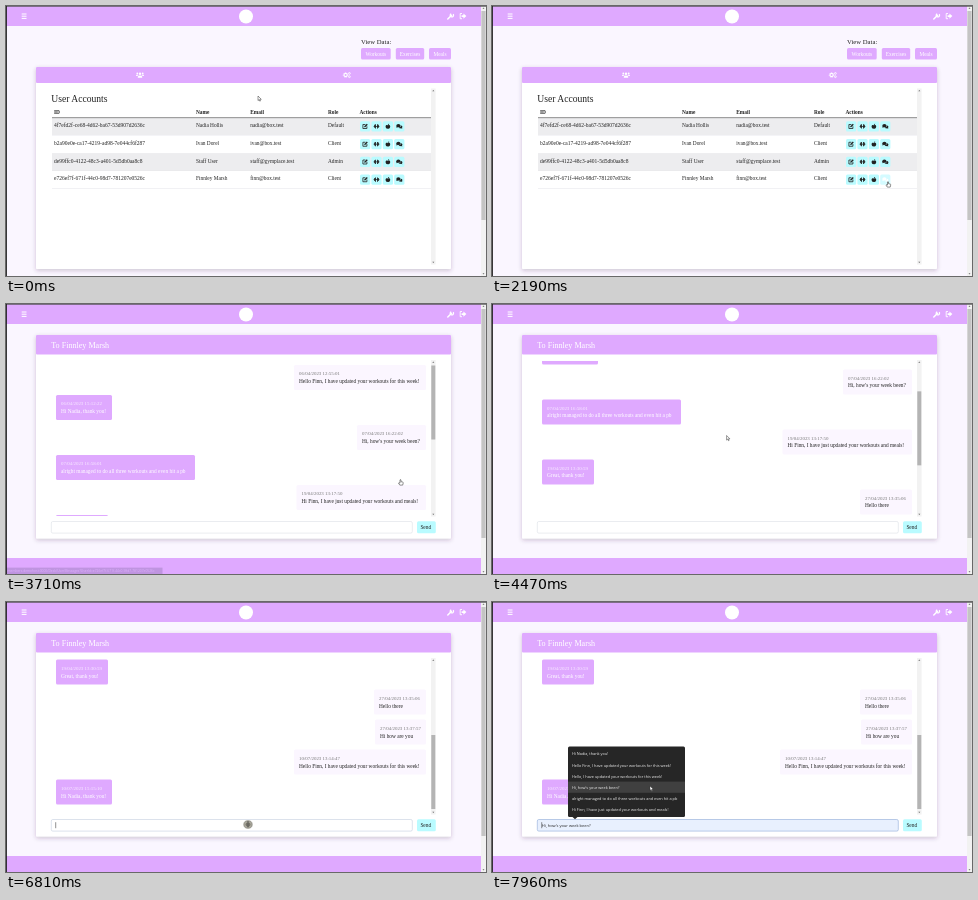
An HTML page that plays this animation: 480 px wide and 270 px high, repeating every 7.99 s.

```html
<!DOCTYPE html>
<html lang="en">
<head>
<meta charset="utf-8">
<title>Messages</title>
<style>
html, body { margin: 0; width: 100%; height: 100%; overflow: hidden; background: #faf6ff; }
svg { display: block; width: 100vw; height: 100vh; }
text { font-family: "Liberation Serif", serif; white-space: pre; }
.sans { font-family: "Open Sans", "Noto Sans", sans-serif; }
</style>
</head>
<body>
<svg id="stage" viewBox="0 0 480 270">
  <defs>
    <filter id="shadow" x="-10%" y="-10%" width="120%" height="125%">
      <feDropShadow dx="0" dy="1.6" stdDeviation="2.2" flood-color="#3b2a4a" flood-opacity=".24"/>
    </filter>
    <clipPath id="pane"><rect x="45" y="57" width="380" height="155"/></clipPath>
    <g id="edit" fill="none" stroke="currentColor" stroke-width=".8">
      <path d="M.3-1.8H-2.2V2.2H1.8V0"/><path d="M-.6.7L2.2-2.1" stroke-width="1.3"/>
    </g>
    <g id="dumbbell" fill="currentColor">
      <path d="M-2.9-.4H2.9V.4H-2.9zM-2.4-1.5h.8v3h-.8zM1.6-1.5h.8v3h-.8zM-1.5-2.1h.9v4.2h-.9zM.6-2.1h.9v4.2H.6z"/>
    </g>
    <g id="apple" fill="currentColor">
      <path d="M0-.9C1-1.7 2.5-1.2 2.3.5 2.1 2 1 2.9 0 2.3-1 2.9-2.1 2-2.3.5-2.5-1.2-1-1.7 0-.9z"/>
      <path d="M-.1-1.2Q0-2.6 1.3-2.6Q1.2-1.3-.1-1.2z"/>
    </g>
    <g id="chat" fill="currentColor">
      <ellipse cx="-.9" cy="-.6" rx="2.1" ry="1.6"/><path d="M-2.6 0L-3 1.5L-1 .8z"/>
      <path d="M1.4-.8C3.4-.7 3.4 1 2.7 1.5L3 2.5L1.7 2C.4 2.3-.5 1.7-.7 1.3 1 1.2 1.6.2 1.4-.8z"/>
    </g>
    <g id="users" fill="#fff">
      <circle cy="-1.3" r="1.2"/><circle cx="-2.7" cy="-1.7" r=".9"/><circle cx="2.7" cy="-1.7" r=".9"/>
      <path d="M-2.2 2.7V1.8Q-2 .4 0 .4T2.2 1.8V2.7zM-4 .9Q-4-.5-2.6-.5Q-1.7-.5-1.4-.1Q-2.4.3-2.6.9zM4 .9Q4-.5 2.6-.5Q1.7-.5 1.4-.1Q2.4.3 2.6.9z"/>
    </g>
    <g id="cogs" fill="none" stroke="#fff">
      <circle cx="-1.4" cy="0" r="1.6" stroke-width="1.1"/>
      <circle cx="-1.4" cy="0" r="2.4" stroke-width=".6" stroke-dasharray=".95 .93"/>
      <circle cx="2.4" cy="-1.6" r=".9" stroke-width=".8"/><circle cx="2.4" cy="1.7" r=".9" stroke-width=".8"/>
    </g>
    <path id="arrow" d="M0 0V4.6L1.1 3.6L1.8 5.2L2.5 4.9L1.8 3.3H3.3z" fill="#fff" stroke="#333" stroke-width=".5"/>
    <path id="hand" d="M-.5.2Q0-.4.5.2V2L2.3 2.4Q2.9 2.6 2.7 3.4L2.2 5.4H-.7L-2 3.4Q-1.7 2.6-.5 3.4z" fill="#fff" stroke="#222" stroke-width=".5"/>
    <path id="beam" d="M-1-2.5H1M0-2.5V2.5M-1 2.5H1" fill="none" stroke="#444" stroke-width=".5"/>
  </defs>
</svg>
<script>
const LOOP = 7990, LILAC = '#dfa9ff', CYAN = '#b9fbff', INK = '#222';
const stage = document.getElementById('stage');
const $ = id => document.getElementById(id);

const rect = (x, y, w, h, fill, extra = '') =>
  `<rect x="${x}" y="${y}" width="${w}" height="${h}" fill="${fill}" ${extra}/>`;
const text = (x, y, s, size = 5.35, fill = INK, extra = '') =>
  `<text x="${x}" y="${y}" font-size="${size}" fill="${fill}" ${extra}>${s}</text>`;
const icon = (name, x, y) => `<use href="#${name}" x="${x}" y="${y}"/>`;
const group = (id, body, extra = '') => `<g id="${id}" ${extra}>${body}</g>`;

function scrollbar(x, y, w, h, thumb) {
  const c = x + w / 2, b = y + h;
  return rect(x, y, w, h, '#f2f2f2') + thumb +
    `<path d="M${c - 1} ${y + 2.8}h2l-1-1.3zM${c - 1} ${b - 2.8}h2l-1 1.3z" fill="#666"/>`;
}

const card = (y, h, head) =>
  rect(30, y, 415, h, '#fff', 'rx="1" filter="url(#shadow)"') + rect(30, y, 415, head, LILAC, 'rx="1"');

const header = rect(0, 0, 480, 20, LILAC) +
  '<path d="M15.7 8h4.8M15.7 10.2h4.8M15.7 12.4h4.8" stroke="#fff" stroke-width="1"/>' +
  '<circle cx="240" cy="10.5" r="7" fill="#fff"/>' +
  '<path d="M441.8 13L445.6 9.2" stroke="#fff" stroke-width="1.5" stroke-linecap="round"/>' +
  '<path d="M447.6 7.4A1.7 1.7 0 1 1 445.6 6.9" transform="translate(-.4 .8)" fill="none" stroke="#fff" stroke-width="1.2"/>' +
  '<path d="M456 7.5H454.2V12.7H456" fill="none" stroke="#fff" stroke-width=".9"/>' +
  '<path d="M455.6 9.3H457.4V7.5L460.4 10.1L457.4 12.7V10.9H455.6z" fill="#fff"/>';

const accounts = [
  ['4f7efd2f-ce68-4d62-ba67-53d907d2636c', 'Nadia Hollis', 'nadia@box.test', 'Default'],
  ['b2a90e0e-ca17-4219-ad98-7e044cf6f287', 'Ivan Dorel', 'ivan@box.test', 'Client'],
  ['de99ffc0-4122-48c3-a401-5d5db0aa8c8', 'Staff User', 'staff@gymplace.test', 'Admin'],
  ['e726ef7f-671f-44c0-98d7-781207e0526c', 'Finnley Marsh', 'finn@box.test', 'Client']
];
const columns = [48, 190, 244.3, 322, 353.5];

function accountRow(row, i) {
  const y = 111.8 + i * 17.75;
  const cells = row.map((s, c) => text(columns[c], y + 9.4, s, c ? 5.35 : 5.5)).join('');
  const buttons = ['edit', 'dumbbell', 'apple', 'chat'].map((name, c) => {
    const x = 354 + c * 11.4, last = i === 3 && c === 3;
    return group(last ? 'target' : `b${i}${c}`,
      rect(x, y + 3.4, 10.2, 10.2, CYAN, 'rx="1.5"') + icon(name, x + 5.1, y + 8.5), `color="${INK}"`);
  }).join('');
  return rect(46, y, 379, 17.75, i % 2 ? '#fff' : '#ededef') +
    rect(46, y + 17.5, 379, .4, '#dcdce2') + cells + buttons;
}

const navButton = (x, w, s) => rect(x, 42, w, 11.6, LILAC, 'rx="1.5"') +
  text(x + w / 2, 49.6, s, 5.35, '#fff', 'text-anchor="middle"');

const listView = text(355, 38, 'View Data:', 6.7) +
  navButton(355, 29.7, 'Workouts') + navButton(389.8, 28.4, 'Exercises') + navButton(423, 22, 'Meals') +
  card(61, 202, 16) + icon('users', 134, 69) + icon('cogs', 341, 69) +
  text(45.3, 95.6, 'User Accounts', 9.6) +
  ['ID', 'Name', 'Email', 'Role', 'Actions'].map((s, c) =>
    text(columns[c], 108.2, s, 5.35, INK, 'font-weight="bold"')).join('') +
  accounts.map(accountRow).join('') + rect(46, 111.5, 379, .6, '#444') +
  scrollbar(425, 82.5, 4.6, 176, '') +
  scrollbar(475, 0, 5, 270, rect(475.4, 5, 4.2, 209, '#c4c4c4'));

const WEEK = 'I have updated your workouts for this week!';
const HELLO = `Hello Finn, ${WEEK}`, THANKS = 'Hi Nadia, thank you!';
const ASK = "Hi, how's your week been?";
const PB = 'alright managed to do all three workouts and even hit a pb';
const MEALS = 'Hi Finn, I have just updated your workouts and meals!';
// left edge, width, date, body
const messages = [
  [288, 132, '06/04/2023 12:55:01', HELLO],
  [50, 56, '06/04/2023 15:12:22', THANKS],
  [351, 69, '07/04/2023 16:22:02', ASK],
  [50, 139, '07/04/2023 16:58:01', PB],
  [290.5, 129.5, '19/04/2023 13:17:50', MEALS],
  [50, 52, '19/04/2023 13:30:59', 'Great, thank you!'],
  [368, 52, '27/04/2023 13:35:06', 'Hello there'],
  [369, 51, '27/04/2023 13:37:57', 'Hi how are you'],
  [288, 132, '10/07/2023 13:14:47', HELLO],
  [50, 56, '10/07/2023 15:15:10', THANKS]
];

function bubble([x, w, date, body], i) {
  const y = 61 + i * 30, mine = x > 50;
  return rect(x, y, w, 25, mine ? '#fbf6ff' : LILAC, 'rx="1.5"') +
    text(x + 5, y + 10.4, date, 4.9, mine ? '#777' : '#f8ecff') +
    text(x + 5, y + 18, body, 5.35, mine ? INK : '#fff');
}

const options = [THANKS, HELLO, `Hello, ${WEEK}`, ASK, PB, MEALS];
const OPTION_TOP = 146.4, OPTION_H = 11.2;
const menu = rect(76, 144.6, 117, 70.4, '#262626', 'rx="1.5"') +
  '<path d="M80.5 214.9h5l-2.5 2.4z" fill="#262626"/>' +
  rect(76, 0, 117, OPTION_H, '#404040', 'id="hover"') +
  options.map((s, i) => text(80, OPTION_TOP + i * OPTION_H + 7, s, 3.87, '#eee', 'class="sans"')).join('');

const chatView = card(31, 203.5, 19.5) + text(45.2, 43.8, 'To Finnley Marsh', 8.1, '#fff') +
  `<g clip-path="url(#pane)">${group('thread', messages.map(bubble).join(''))}</g>` +
  scrollbar(425, 56, 4.6, 156.5, rect(425.3, 61.5, 4, 74, '#b4b4b4', 'id="thumb"')) +
  rect(45.3, 217.5, 361, 11.6, '#fff', 'id="field" rx="1.5" stroke="#dcdfe6" stroke-width=".6"') +
  rect(49.6, 220.2, .5, 6, '#222', 'id="caret"') +
  text(49.8, 225, '', 3.97, INK, 'id="preview" class="sans"') +
  rect(411, 217.3, 18.8, 12, CYAN, 'rx="1.5"') + text(414.4, 225, 'Send') +
  rect(0, 254, 475, 16, LILAC) +
  scrollbar(475, 0, 5, 270, rect(475.4, 5, 4.2, 229, '#c4c4c4')) + group('menu', menu);

const status = rect(0, 263.6, 156.5, 6.4, '#1f2a47') +
  text(1.5, 268.2, 'members.demohost:0000/Desk/UserMessages?UserId=e726ef7f-671f-44c0-98d7-781207e0526c',
    3.3, '#d5daea', 'class="sans"');

const dot = '<ellipse rx="4.2" ry="3.8" fill="#a9a79b" stroke="#85837a" stroke-width=".7"/>' +
  '<ellipse rx="2.4" ry="1.9" fill="#77756c"/>';

stage.insertAdjacentHTML('beforeend', rect(0, 0, 480, 270, '#faf6ff') + header +
  group('list', listView) + group('chatView', chatView) + group('status', status) +
  rect(0, 0, 480, .7, '#555') + rect(0, 0, .9, 270, '#222') +
  group('dot', dot, 'transform="translate(242 222.5)"') + '<use id="cursor"/>');

const clamp = v => Math.max(0, Math.min(1, v));
const ramp = (t, a, b) => clamp((t - a) / (b - a));
const smooth = p => p * p * (3 - 2 * p);
const show = (id, on) => $(id).setAttribute('visibility', on ? 'inherit' : 'hidden');
const set = (id, attrs) => { for (const k in attrs) $(id).setAttribute(k, attrs[k]); };

// time, x, y
const path = [
  [0, 252, 90], [410, 252, 90], [550, 313, 112], [920, 313, 112], [1170, 297, 142],
  [1700, 391, 197], [1730, 391, 197], [2000, 397.5, 172], [2190, 396, 175.7], [2360, 394, 175.7],
  [3750, 394.5, 175.7], [4060, 234.6, 131.5], [5290, 234.6, 131.5], [5600, 96, 206],
  [5920, 265, 183], [6150, 265, 183], [6470, 242, 222.3], [7300, 242, 222.3],
  [7600, 172, 206], [7960, 158, 184]
];

function pointer(t) {
  const i = path.findIndex(p => p[0] > t);
  if (i < 0) return path[path.length - 1].slice(1);
  const [ta, xa, ya] = path[i - 1], [tb, xb, yb] = path[i];
  const p = smooth(ramp(t, ta, tb));
  return [xa + (xb - xa) * p, ya + (yb - ya) * p];
}

function draw(t) {
  const chatting = t >= 3320, [x, y] = pointer(t);
  show('list', !chatting);
  show('chatView', chatting);

  const over = !chatting && x > 388 && x < 398.6 && y > 168 && y < 179;
  const pressed = t >= 3050;
  $('target').setAttribute('color', over ? '#fff' : INK);
  const box = $('target').firstElementChild;
  box.setAttribute('fill', over ? (pressed ? '#b7dfeb' : '#d4fbff') : CYAN);
  box.setAttribute('stroke', pressed ? '#9fd0e2' : 'none');

  $('status').setAttribute('opacity', ramp(t, 2490, 2610) * (1 - ramp(t, 3560, 3740)));

  const scroll = smooth(ramp(t, 4410, 4560));
  set('thread', { transform: `translate(0 ${-153.5 * scroll})` });
  set('thumb', { y: 61.5 + 71.5 * scroll });

  const open = t >= 6900, focus = t >= 6780;
  const row = Math.floor((y - OPTION_TOP) / OPTION_H);
  const hovering = open && x < 193 && row >= 0 && row < options.length;
  show('menu', chatting && open);
  show('hover', chatting && hovering);
  if (hovering) set('hover', { y: OPTION_TOP + row * OPTION_H - .4 });
  $('preview').textContent = hovering ? options[row] : '';
  show('caret', chatting && focus);
  set('field', {
    fill: hovering ? '#e8f0fe' : '#fff',
    stroke: hovering ? '#8fabd8' : focus ? '#c5cfe0' : '#dcdfe6'
  });

  $('dot').setAttribute('opacity', ramp(t, 6770, 6800) * (1 - ramp(t, 6870, 7000)));

  const typing = chatting && y > 217.5;
  const pointing = over || (chatting && t < 3780);
  set('cursor', {
    href: typing ? '#beam' : pointing ? '#hand' : '#arrow',
    transform: `translate(${x} ${y})`
  });
}

const start = performance.now();
function tick() {
  draw((performance.now() - start) % LOOP);
  requestAnimationFrame(tick);
}
tick();
</script>
</body>
</html>
```
